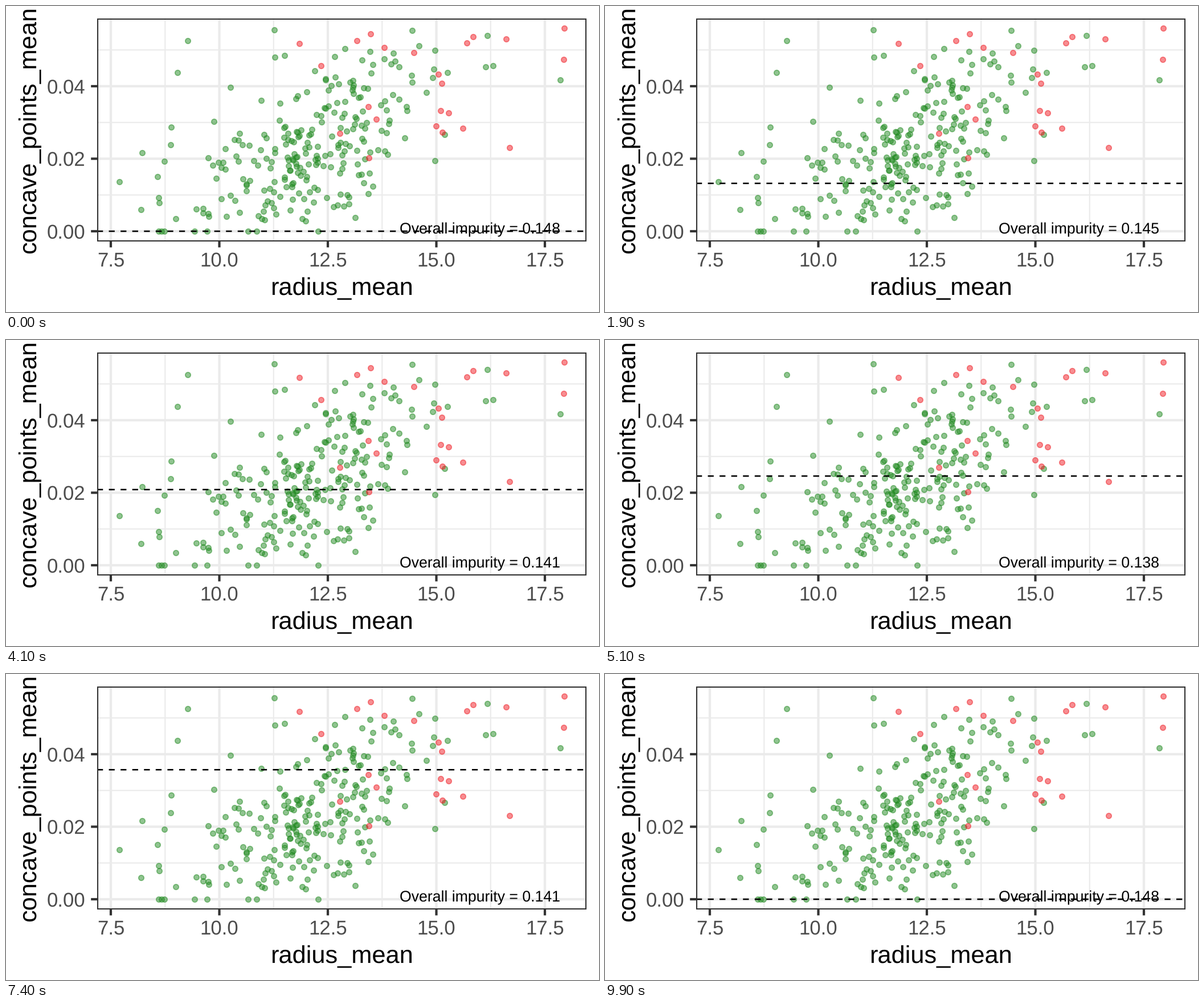
A matplotlib script for the animation above (10 s loop, 1041x538 px).

```python
import numpy as np
import matplotlib.pyplot as plt
from matplotlib.animation import FuncAnimation
from matplotlib.patches import Rectangle

W, H, DPI = 1041, 538, 128
FRAMES, INTERVAL = 100, 100
PT = 72 / DPI  # points per pixel

LEFT, RIGHT, TOP, BOTTOM = 160, 1019, 21.7, 413.6
ZERO = 396
GREEN, RED = "#228B22", "#F01C24"
GRID, AXIS, LABEL = "#EBEBEB", "#333333", "#4D4D4D"
TITLE_SIZE, TICK_SIZE, NOTE_SIZE = 43.4, 34.7, 26.6

plt.rcParams["font.family"] = "Liberation Sans"
plt.rcParams["text.hinting"] = "none"

# Frame, height of the split line, number of points below it
KEY_FRAMES, KEY_Y, KEY_RANKS = np.transpose([
    (0, ZERO, 0), (1, 377, 3), (10, 341.7, 29), (27, 285.3, 79),
    (41, 263, 118), (62, 213, 185), (86, 123.6, 248), (98, 43, 282)])

malignant = np.array([
    (515, 65.5), (616, 61), (640, 49), (664, 72.5), (553, 105), (716, 81.5),
    (809, 65), (820, 54), (877.5, 58), (980, 39), (979, 93.5), (759, 119.5),
    (765, 136), (763, 183.5), (777, 188), (755, 211), (765.5, 221.5),
    (802, 214.5), (884, 249), (636, 177), (649.5, 199), (586, 223.5),
    (636.5, 266.5)])

isolated = np.array([
    (199, 309), (237, 358), (239, 258), (266, 300), (268, 337), (269, 346),
    (278, 273), (289, 244), (290, 213), (298, 374), (301, 117), (319, 61),
    (365, 203), (394, 143), (448, 166), (471, 42), (472, 90), (713, 43),
    (753, 272), (770, 226), (842, 107), (845, 52), (855, 105), (973, 130)])

on_axis = np.array([(x, ZERO) for x in (267.5, 273, 278, 330.5, 353, 425, 440, 547.5)])


def cloud(n, seed=11):
    """Correlated points whose heights follow the split line's path."""
    rng = np.random.default_rng(seed)
    u = ((np.arange(n) + rng.random(n)) / n) ** 1.08
    y = np.interp(0.01 + 0.95 * u, KEY_RANKS / KEY_RANKS[-1], KEY_Y)
    x = 535 - 0.6 * (y - 262) + rng.triangular(-190, 0, 190, n)
    return np.column_stack([x, y])


benign = np.vstack([isolated, on_axis, cloud(230)])
TOTAL = len(benign) + len(malignant)


def gini_sum(bad, n):
    return 2 * bad * (n - bad) / n if n else 0


def split_at(frame):
    """Return line height and weighted impurity of the split."""
    frame %= FRAMES - 1
    y = np.interp(frame, KEY_FRAMES, KEY_Y)
    below = np.interp(frame, KEY_FRAMES, KEY_RANKS)
    bad_below = np.sum(malignant[:, 1] > y)
    bad_above = len(malignant) - bad_below
    total = gini_sum(bad_below, below) + gini_sum(bad_above, TOTAL - below)
    return y, total / TOTAL


fig = plt.figure(figsize=(W / DPI, H / DPI), dpi=DPI, facecolor="white")
ax = fig.add_axes([0, 0, 1, 1])
ax.set(xlim=(0, W), ylim=(H, 0))
ax.axis("off")


def stroke(x, y, width, color, z=1, **kw):
    return ax.plot(x, y, color=color, lw=width * PT, zorder=z, snap=False,
                   solid_capstyle="butt", dash_capstyle="butt", **kw)[0]


def label(x, y, s, size, color="black", ha="center", **kw):
    return ax.text(x, y, s, fontsize=size * PT, color=color, ha=ha,
                   va="baseline", zorder=6, **kw)


def scatter(points, color, z):
    ax.scatter(*points.T, s=(9.4 * PT) ** 2, c=color, edgecolors=color,
               linewidths=1.7 * PT, alpha=0.5, zorder=z)


x_ticks = [184 + 190.5 * k for k in range(5)]
y_ticks = [ZERO - 127.5 * k for k in range(3)]

for x in x_ticks[:-1]:
    stroke([x + 95.25] * 2, [TOP, BOTTOM], 2.1, GRID)
for y in y_ticks:
    stroke([LEFT, RIGHT], [y - 63.75] * 2, 2.1, GRID)
for k, x in enumerate(x_ticks):
    stroke([x, x], [TOP, BOTTOM], 4.2, GRID)
    stroke([x, x], [BOTTOM, BOTTOM + 10.8], 4.2, AXIS)
    label(x, 458, f"{7.5 + 2.5 * k:.1f}", TICK_SIZE, LABEL)
for k, y in enumerate(y_ticks):
    stroke([LEFT, RIGHT], [y, y], 4.2, GRID)
    stroke([LEFT - 10.8, LEFT], [y, y], 4.2, AXIS)
    label(139.5, y + 12.4, f"{0.02 * k:.2f}", TICK_SIZE, LABEL, ha="right")

scatter(benign, GREEN, 2)
scatter(malignant, RED, 3)

ax.add_patch(Rectangle((LEFT + 1, TOP + 1), RIGHT - LEFT - 2, BOTTOM - TOP - 2,
                       fill=False, ec=AXIS, lw=2.1 * PT, zorder=5,
                       joinstyle="miter"))
label(589.5, 507.3, "radius_mean", TITLE_SIZE)
label(52.3, 217.7, "concave_points_mean", TITLE_SIZE, rotation=90,
      rotation_mode="anchor")

cut_line = stroke([LEFT, RIGHT], [ZERO, ZERO], 2.57, "black", 4,
                  linestyle=(0, (4, 4)))
impurity = label(831.5, 400, "", NOTE_SIZE)


def update(frame):
    y, value = split_at(frame)
    cut_line.set_ydata([y, y])
    impurity.set_text(f"Overall impurity = {value:.3f}")
    return cut_line, impurity


anim = FuncAnimation(fig, update, frames=FRAMES, interval=INTERVAL,
                     repeat=True, repeat_delay=0, blit=False)
plt.show()
```
